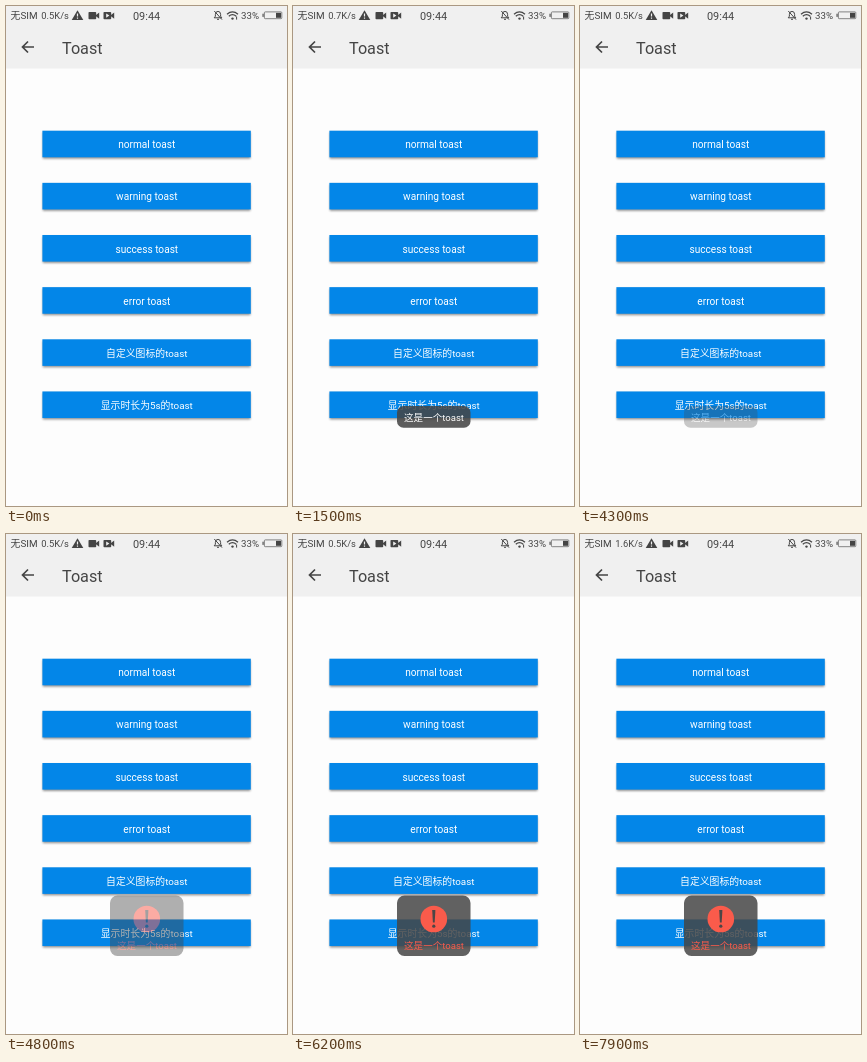
These frames come from a looping animation (281 px wide and 500 px high, 8000 ms). An HTML page:

```html
<!DOCTYPE html>
<html lang="zh-CN">
<head>
<meta charset="utf-8">
<title>Toast</title>
<style>
  html, body { margin: 0; width: 100%; height: 100%; overflow: hidden; background: #fdfdfd; }
  svg { display: block; width: 281px; height: 500px; }
  text { font-family: Roboto, "Noto Sans CJK SC", "Noto Sans CJK", sans-serif; }
  .bar { fill: #444; }
  .line { fill: none; stroke: #444; }
  .mid { text-anchor: middle; }
</style>
</head>
<body>
<svg viewBox="0 0 281 500">
  <defs>
    <filter id="soft" x="-5%" y="-20%" width="110%" height="150%">
      <feGaussianBlur stdDeviation="0.9"/>
    </filter>
  </defs>
  <rect width="281" height="500" fill="#fdfdfd"/>
  <rect width="281" height="62.5" fill="#f0f0f0"/>

  <g class="bar">
    <text x="4.5" y="13.3" font-size="9.9">无SIM</text>
    <text id="speed" x="35.3" y="13.2" font-size="9.35">0.5K/s</text>
    <text x="127" y="13.6" font-size="10.9">09:44</text>
    <text x="235" y="13.2" font-size="9.7">33%</text>

    <path d="M71.5 4.2 77.3 14H65.7Z"/>
    <path d="M71.5 7.4V10.6M71.5 11.6V12.8" stroke="#f0f0f0" stroke-width="1.2"/>

    <rect x="82.5" y="6" width="7.7" height="7.2" rx="0.8"/>
    <path d="M90 9 93.2 6.4V12.8L90 10.2Z"/>

    <rect x="97.5" y="6" width="7.7" height="7.2" rx="0.8"/>
    <path d="M105 9 108.2 6.4V12.8L105 10.2Z"/>
    <path d="M100.2 7.5 103.4 9.6 100.2 11.7Z" fill="#f0f0f0"/>

    <circle cx="226.5" cy="12.6" r="1.2"/>
    <rect x="270" y="6.8" width="5" height="5" fill="#444"/>
    <rect x="256.3" y="7.7" width="1.6" height="3.2" fill="#777"/>
  </g>
  <g class="line">
    <path d="M208.2 11.8H215.8L214.6 10.2V8.4A2.6 3 0 0 0 209.4 8.4V10.2ZM211 13.3H213" stroke-width="1"/>
    <path d="M208.3 5 216 13.6" stroke-width="1"/>
    <path d="M221 8.2Q226.5 3.6 232 8.2M222.8 10.2Q226.5 7 230.2 10.2" stroke-width="1.3"/>
    <path d="M230.6 10.5V13.6" stroke-width="1"/>
    <rect x="258.4" y="5.9" width="17.4" height="6.8" rx="0.8" stroke="#777" stroke-width="0.9"/>
    <path d="M28 41H16.7M22 35.5 16.5 41 22 46.5" stroke-width="1.7"/>
  </g>
  <text class="bar" x="56" y="47.5" font-size="16.2">Toast</text>

  <g id="buttons"></g>

  <g id="plain" opacity="0">
    <rect x="104" y="400" width="73.5" height="21.7" rx="6.5" fill="#464646" fill-opacity="0.87"/>
    <text class="mid" x="141" y="414.5" font-size="9.55" fill="#fff">这是一个toast</text>
  </g>
  <g id="error" opacity="0">
    <rect x="104" y="361.5" width="73.5" height="60.5" rx="7.5" fill="#464646" fill-opacity="0.85"/>
    <circle cx="140.8" cy="385" r="13.3" fill="#fa5b4b"/>
    <path d="M139.2 376H142.4L141.7 388.6H139.9Z" fill="#4c4646"/>
    <circle cx="140.8" cy="392.2" r="1.6" fill="#4c4646"/>
    <text class="mid" x="141" y="414.5" font-size="9.55" fill="#fa5b4b">这是一个toast</text>
  </g>
</svg>
<script>
  const LOOP = 8000, STEP = 100;
  const byId = id => document.getElementById(id);
  const plain = byId('plain'), error = byId('error'), speed = byId('speed');

  const labels = ['normal toast', 'warning toast', 'success toast', 'error toast',
    '自定义图标的toast', '显示时长为5s的toast'];

  byId('buttons').innerHTML = labels.map((label, i) => {
    const y = 124.7 + i * 52.15;
    const size = i < 4 ? 10.15 : 9.85;
    return `<rect x="36.8" y="${y + 1.6}" width="207.6" height="26.4" fill="#000" opacity="0.42" filter="url(#soft)"/>
      <rect x="36.4" y="${y}" width="208.4" height="26.6" fill="#0386e8"/>
      <text class="mid" x="140.8" y="${y + 17.6}" font-size="${size}" fill="#fff">${label}</text>`;
  }).join('');

  const ramp = (t, from, to) => Math.min(1, Math.max(0, (t - from) / (to - from)));

  function rate(t) {
    if (t < 500) return '0.5';
    if (t < 3500) return '0.7';
    return t < 6500 ? '0.5' : '1.6';
  }

  function draw(ms) {
    const t = Math.floor((ms % LOOP) / STEP) * STEP;
    plain.setAttribute('opacity', ramp(t, 600, 1000) * (1 - ramp(t, 4100, 4400)));
    error.setAttribute('opacity', ramp(t, 4600, 5000));
    speed.textContent = rate(t) + 'K/s';
  }

  let start;
  function tick(now) {
    if (start === undefined) start = now;
    draw(Math.max(0, now - start));
    requestAnimationFrame(tick);
  }
  draw(0);
  requestAnimationFrame(tick);
</script>
</body>
</html>
```
